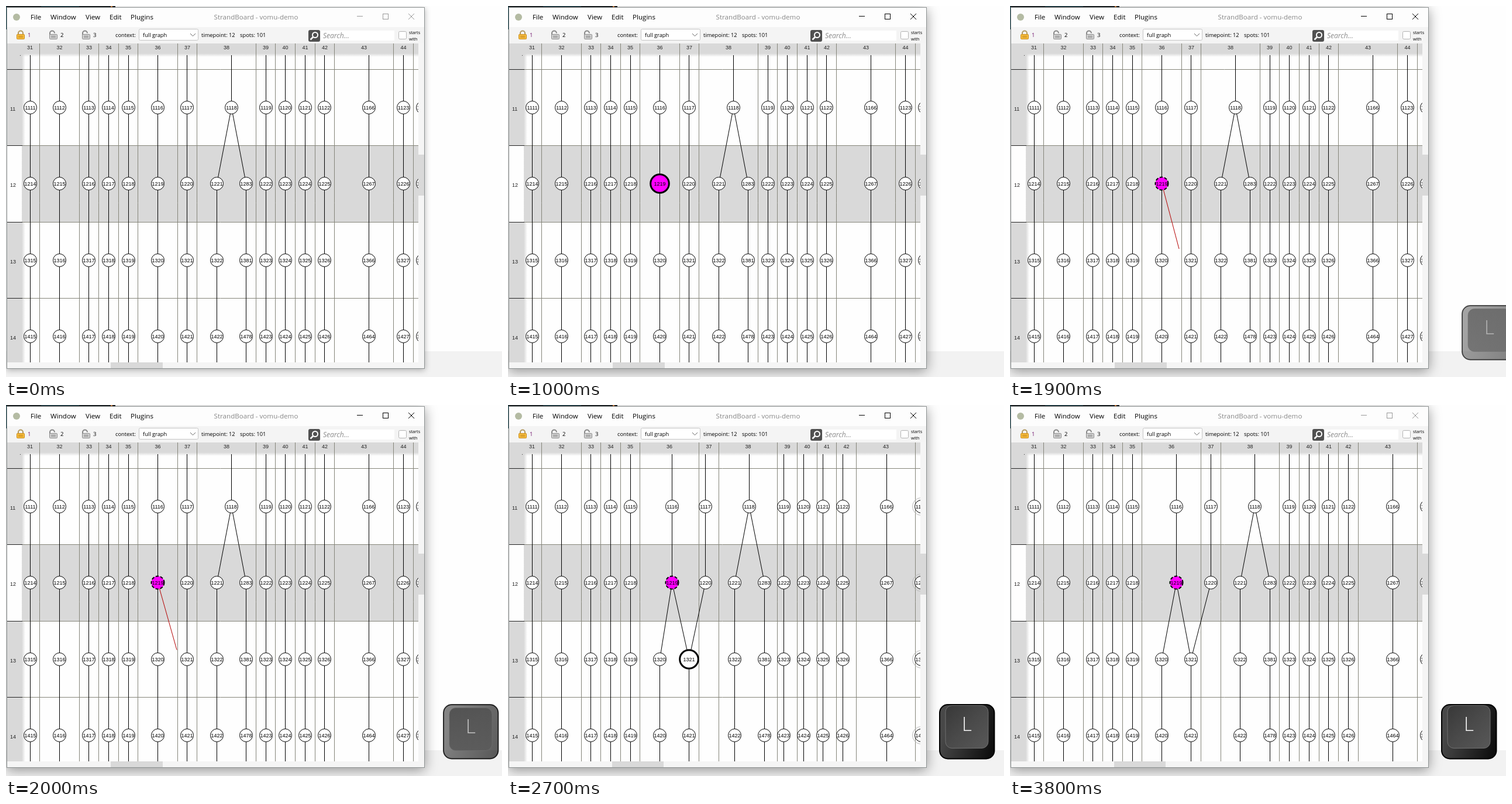
These frames come from a looping animation (848 by 634 pixels, 3900 ms). An HTML page with a canvas:

```html
<!DOCTYPE html>
<html lang="en">
<head>
<meta charset="utf-8">
<title>Lineage view</title>
<style>
  html, body { margin: 0; width: 100%; height: 100%; overflow: hidden; background: #fefefe; }
  canvas { display: block; }
</style>
</head>
<body>
<canvas id="stage" width="848" height="634"></canvas>
<script>
const ctx = document.getElementById('stage').getContext('2d');
const LOOP = 3900, STEP = 100;
const UI = '"Open Sans", "Noto Sans", sans-serif';
const PLAIN = '"Liberation Sans", Arial, sans-serif';
const MAGENTA = '#ff00ff', GRID = '#85857a', HEAD = '#d9d9d9';

const ROW_Y = [173.5, 303.5, 434.5, 564.5];
const FIRST_ID = [1111, 1214, 1315, 1415];
const LANES = [0, 3, 6, 8, 10, 13, 16, 19, 22, 24, 26, 28, 30, 34.5, 38, 40];
const EXTRA = { 8: [0, 1283, 1381, 1478], 13: [1166, 1267, 1366, 1464] };
const COLUMNS_BEFORE = [2, 1, 1, 1, 2, 1, 3, 1, 1, 1, 1, 3, 1];
const COLUMNS_AFTER = [2, 1, 1, 1, 3, 1, 3, 1, 1, 1, 1, 3];

function box(x, y, w, h, fill) {
  ctx.fillStyle = fill;
  ctx.fillRect(x, y, w, h);
}

function line(points, color = '#000', width = 1) {
  ctx.beginPath();
  points.forEach(([x, y]) => ctx.lineTo(x, y));
  ctx.strokeStyle = color;
  ctx.lineWidth = width;
  ctx.stroke();
}

function rounded(x, y, w, h, r, fill, stroke) {
  ctx.beginPath();
  ctx.roundRect(x, y, w, h, r);
  ctx.fillStyle = fill;
  ctx.fill();
  if (stroke) {
    ctx.strokeStyle = stroke;
    ctx.lineWidth = 1;
    ctx.stroke();
  }
}

function circle(x, y, r, fill, stroke, width = 1) {
  ctx.beginPath();
  ctx.arc(x, y, r, 0, 2 * Math.PI);
  if (fill) { ctx.fillStyle = fill; ctx.fill(); }
  if (stroke) { ctx.strokeStyle = stroke; ctx.lineWidth = width; ctx.stroke(); }
}

// y is the middle of the capital letters
function text(s, x, y, size, { align = 'left', color = '#000', family = UI, style = '' } = {}) {
  ctx.font = `${style} ${size}px ${family}`;
  ctx.textAlign = align;
  ctx.fillStyle = color;
  ctx.fillText(s, x, y + size * 0.36);
}

function gradient(x0, y0, x1, y1, ...colors) {
  const g = ctx.createLinearGradient(x0, y0, x1, y1);
  colors.forEach((c, i) => g.addColorStop(i / (colors.length - 1), c));
  return g;
}

const clamp = v => Math.max(0, Math.min(1, v));
const columnEdge = k => Math.round(57.4 + 33.59 * k) + 0.5;

function laneX(lane, row, p) {
  let shift = 0;
  if (lane > 6) shift = 2;
  else if (row < 2 && lane > 4) shift = lane === 5 ? 1.5 : 2;
  return Math.floor(41.1 + 16.795 * (LANES[lane] + shift * p)) + 0.5;
}

function nodePos(lane, row, p) {
  const x = row === 0 && lane === 7
    ? Math.floor(41.1 + 16.795 * (20.5 + 2 * p)) + 0.5
    : laneX(lane, row, p);
  return [x, ROW_Y[row]];
}

function nodeId(lane, row) {
  if (EXTRA[lane]) return EXTRA[lane][row];
  return FIRST_ID[row] + lane - (lane > 8) - (lane > 13);
}

function drawDesktop(t) {
  box(0, 0, 848, 634, '#fefefe');
  box(0, 590, 848, 44, '#f2f2f2');
  const focus = clamp((t - 700) / 300);
  ctx.save();
  ctx.shadowColor = `rgba(0,0,0,${0.3 + 0.1 * focus})`;
  ctx.shadowBlur = 10 + 10 * focus;
  ctx.shadowOffsetY = 2 + 2 * focus;
  box(1, 2, 715, 618, '#8d9292');
  ctx.restore();
  box(0, 0, 187, 2, '#202427');
  box(0, 0, 1, 40, '#1f4650');
  box(60, 0, 65, 1, '#28515c');
  box(179, 0, 3, 2, '#b8743c');
  box(2, 3, 713, 616, '#f4f4f4');
  box(2, 3, 713, 33, '#fdfdfd');
}

function drawLock(x, body, edge, open) {
  ctx.beginPath();
  ctx.arc(x + (open ? 5 : 7), 46.5, 4, Math.PI, 0);
  if (!open) ctx.lineTo(x + 11, 50);
  ctx.moveTo(x + (open ? 1 : 3), 46.5);
  ctx.lineTo(x + (open ? 1 : 3), 50);
  ctx.strokeStyle = open ? '#888' : '#b39a62';
  ctx.lineWidth = 2;
  ctx.stroke();
  rounded(x + 0.5, 48.5, 13, 8, 1, body, edge);
  line([[x + 3, 51.5], [x + 11, 51.5]], edge);
  line([[x + 3, 53.5], [x + 11, 53.5]], edge);
}

function drawBars(active) {
  circle(18, 19, 6, '#b4bba3');
  [['File', 42], ['Window', 76], ['View', 136], ['Edit', 177], ['Plugins', 213]]
    .forEach(([s, x]) => text(s, x, 19, 11.6));
  text('StrandBoard - vomu-demo', 427.5, 19, 11.6, { align: 'center', color: '#888' });

  const ink = active ? '#000' : '#999';
  line([[600, 17.5], [610, 17.5]], ink);
  ctx.strokeRect(644.5, 13.5, 9, 9);
  line([[688, 13], [698, 23]], ink);
  line([[698, 13], [688, 23]], ink);

  drawLock(18, '#f5bd3f', '#c98a1b', false);
  drawLock(74, '#d2d2d2', '#8a8a8a', true);
  drawLock(130, '#d2d2d2', '#8a8a8a', true);
  text('1', 37, 50, 9.6, { color: '#70106c' });
  text('2', 93, 50, 9.6);
  text('3', 149, 50, 9.6);

  text('context:', 187, 50, 9.3);
  rounded(227.5, 39.5, 101, 19, 2, '#fff', '#c4c4c4');
  text('full graph', 234, 50, 9.3);
  line([[315, 47], [319.5, 51.5], [324, 47]], '#666');
  text('timepoint: 12', 334, 50, 9.3);
  text('spots: 101', 400, 50, 9.3);

  rounded(517, 41, 20, 20, 3, '#505050');
  circle(528.5, 49.5, 4.5, null, '#fff', 2);
  line([[525, 53], [520.5, 57.5]], '#fff', 2.5);
  box(538, 42, 126, 17, '#fff');
  text('Search...', 542, 51, 12, { color: '#8c8c8c', style: 'italic' });
  rounded(671.5, 43.5, 13, 13, 2, '#fff', '#b4b4b4');
  text('starts', 689, 45, 7.3);
  text('with', 689, 56, 7.3);
}

function drawNode(lane, row, p, t) {
  const [x, y] = nodePos(lane, row, p);
  const origin = lane === 5 && row === 1;
  const target = lane === 6 && row === 2;
  const fill = origin && t >= 900 ? MAGENTA : '#fff';
  const hover = (origin && t >= 600 && t < 1600) || (target && t >= 2200 && t < 3200);
  if (hover) {
    circle(x, y, 15.8, fill, '#000', 3);
  } else if (origin && t >= 1600) {
    ctx.setLineDash([5, 3]);
    circle(x, y, 11, fill, '#000', 2);
    ctx.setLineDash([]);
  } else {
    circle(x, y, 11, fill, '#000');
  }
  text(nodeId(lane, row), x, y, 9, { align: 'center', family: PLAIN });
}

function drawEdges(p, t) {
  LANES.forEach((_, lane) => {
    const path = [0, 1, 2, 3].map(row => nodePos(lane, row, p));
    if (lane === 8) path[0] = nodePos(7, 0, p);
    else path.unshift([path[0][0], 64]);
    path.push([path.at(-1)[0], 610]);
    line(path);
  });
  const from = nodePos(5, 1, p), to = nodePos(6, 2, p);
  if (t >= 2700) {
    line([from, to]);
  } else if (t >= 2200) {
    line([from, to], '#b40000', 2);
  } else if (t >= 1700) {
    const fast = clamp((t - 1600) / 300), slow = clamp((t - 1900) / 200);
    line([from, [259.5 + 29.5 * fast + 6 * slow, 303.5 + 111.5 * fast + 7 * slow]], '#b40000');
  }
}

function drawGraph(t) {
  const p = t < 2700 ? 0 : t < 2800 ? 0.817 : 1;
  const moved = t >= 2700;
  ctx.save();
  ctx.beginPath();
  ctx.rect(2, 64, 703, 545);
  ctx.clip();
  box(2, 64, 703, 545, '#fefefe');
  box(28, 239, 677, 130, HEAD);

  // headers with soft inner edges
  box(2, 64, 25, 545, HEAD);
  box(27, 64, 6, 545, gradient(27, 0, 33, 0, HEAD, 'rgba(217,217,217,0)'));
  box(2, 64, 703, 17, HEAD);
  box(27, 81, 678, 6, gradient(0, 81, 0, 87, HEAD, 'rgba(217,217,217,0)'));
  box(2, 239, 25, 130, '#fefefe');

  let k = 0, left = 24.3;
  const widths = moved ? COLUMNS_AFTER : COLUMNS_BEFORE;
  [0, ...widths].forEach((w, i) => {
    k += w;
    const x = columnEdge(k);
    line([[x, 64], [x, 609]], GRID);
    text(31 + i, (left + x) / 2, 71, 9, { align: 'center', family: PLAIN, color: '#222' });
    left = x;
  });
  [108.5, 238.5, 369.5, 499.5].forEach((y, i) => {
    line([[28, y], [705, y]], GRID);
    line([[2, y], [28, y]], '#222');
    text(11 + i, 7, ROW_Y[i] + 2, 9, { family: PLAIN, color: '#222' });
  });
  box(24, 84, 1, 1, '#333');

  ctx.beginPath();
  ctx.rect(28, 84, 677, 525);
  ctx.clip();
  drawEdges(p, t);
  for (let row = 0; row < 4; row++) {
    // the last lane slides out of view while its outline grows and fades
    if (p > 0 && p < 1) circle(nodePos(14, row, p)[0], ROW_Y[row], 15, null, '#bbb');
    LANES.forEach((_, lane) => {
      if ((lane === 8 && row === 0) || (lane === 15 && p > 0)) return;
      drawNode(lane, row, p, t);
    });
  }
  ctx.restore();

  box(705, 64, 10, 555, '#f5f5f5');
  box(2, 609, 713, 10, '#f5f5f5');
  box(705, 254, 10, 70, HEAD);
  box(moved ? 178 : 179, 609, moved ? 88 : 89, 10, HEAD);
}

function drawKey(t) {
  const q = clamp((t - 1600) / 600);
  if (!q) return;
  const dy = t < 2700 ? 4 : 0;
  ctx.save();
  ctx.globalAlpha = q;
  ctx.translate(Math.round(280 * (1 - q) ** 3), 0);
  rounded(738, 512, 93.5, 92.5, 14, gradient(740, 570, 830, 595, '#484848', '#2a2a2a', '#0c0c0c'), '#000');
  ctx.lineWidth = 2;
  ctx.stroke();
  rounded(748, 513.5 + dy, 73, 73, 11, gradient(748, 514, 821, 587, '#383838', '#4a4a4a', '#585858'), '#707070');
  text('L', 784.5, 545 + dy, 33, { align: 'center', color: '#f4f4f4', style: '300' });
  ctx.restore();
}

function draw(now) {
  const t = Math.floor((now % LOOP) / STEP) * STEP;
  drawDesktop(t);
  drawBars(t >= 800 && t < 3800);
  drawGraph(t);
  drawKey(t);
}

const start = performance.now();
function tick() {
  draw(performance.now() - start);
  requestAnimationFrame(tick);
}
tick();
</script>
</body>
</html>
```
